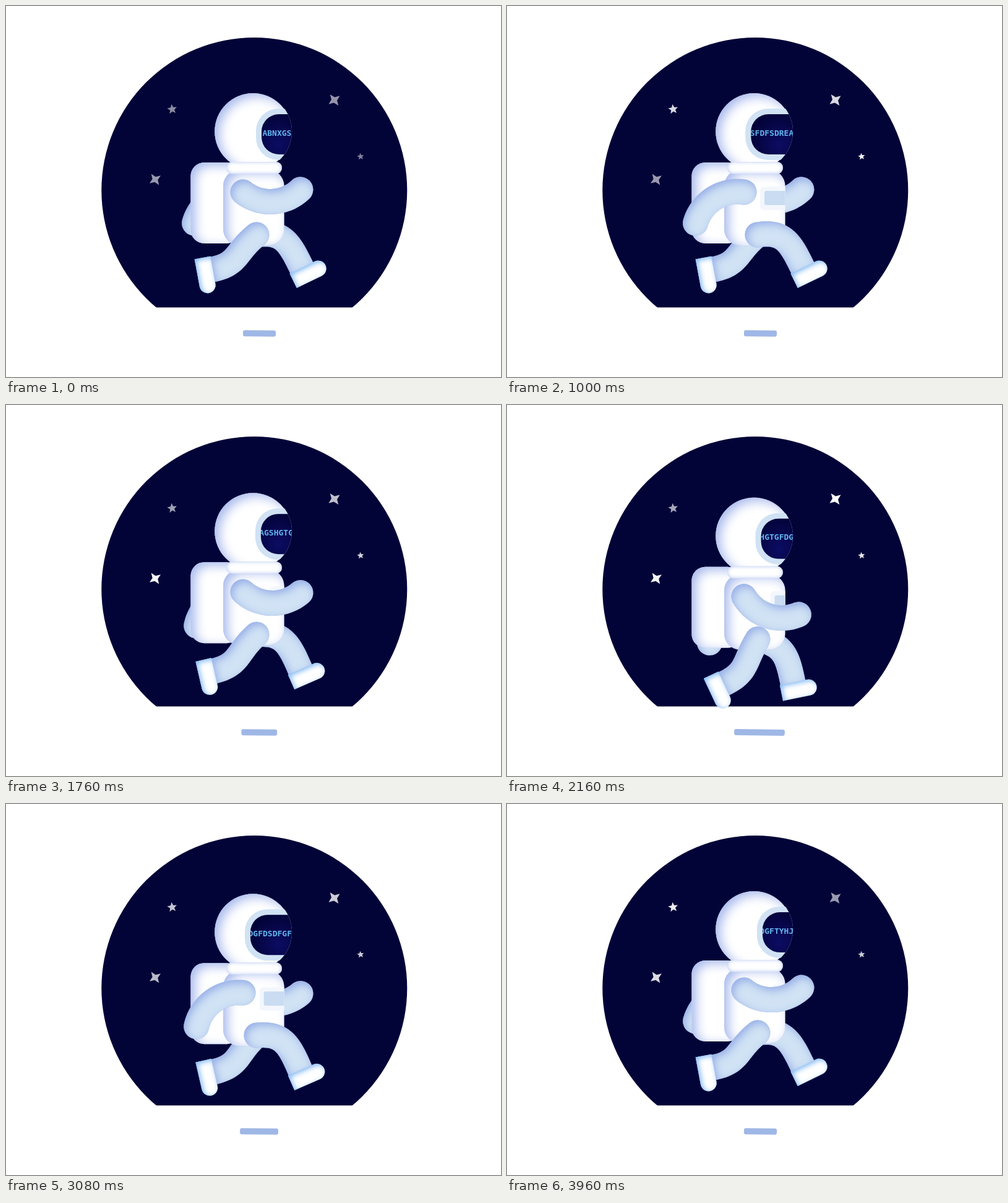
An HTML page with a canvas that plays this animation: 800 by 600 pixels, repeating every 4 s.

```html
<!DOCTYPE html>
<html lang="en">
<head>
<meta charset="utf-8">
<title>Running astronaut</title>
<style>
  html, body { margin: 0; width: 100%; height: 100%; overflow: hidden; background: #fff; }
  canvas { display: block; }
</style>
</head>
<body>
<canvas id="stage" width="800" height="600"></canvas>
<script>
const ctx = document.getElementById('stage').getContext('2d');
const LOOP = 4000, STEP = 1000;
const RAD = Math.PI / 180;
const SUIT = '#fff', LIMB = '#d0e2f4', LIMB_SHADE = '#94ace6', NIGHT = '#020337';
const MESSAGE = 'ABNXGSFDFSDREAGSHGTGFDGFDSDFGFDGFTYHJ';

const lerp = (a, b, k) => a + (b - a) * k;

// Cubic bezier easing with flat ends: (x1, 0, x2, 1)
const bezier = (x1, x2) => x => {
  let lo = 0, hi = 1;
  for (let i = 0; i < 24; i++) {
    const s = (lo + hi) / 2, r = 1 - s;
    if (3 * x1 * s * r * r + 3 * x2 * s * s * r + s ** 3 < x) lo = s; else hi = s;
  }
  return 3 * lo * lo * (1 - lo) + lo ** 3;
};
const swingEase = bezier(0.36, 0);
const turnEase = bezier(0.25, 0.4);
const softEase = bezier(0.33, 0.67);
const settleEase = bezier(0.3, 0.2);

// Rises from 0 to 1 at the peak, then falls back to 0
const pulse = (u, peak, rise, fall) =>
  u < peak ? rise(u / peak) : 1 - fall((u - peak) / (1 - peak));

// Brightness keys of each star over the loop
const TWINKLE_TIMES = [0, 1000, 1400, 2160, 2680, 3400, 3960];
const STARS = [
  { x: 268.5, y: 167, tips: 5, r: 8.3, inner: 3.6, turn: -97, glow: [.55, .85, .6, .65, 1, .6, .92] },
  { x: 530.5, y: 152, tips: 4, r: 11.3, inner: 4.6, turn: -37, glow: [.58, .85, .52, 1, .55, 1, .6] },
  { x: 241, y: 280.5, tips: 4, r: 11, inner: 4.4, turn: -35, glow: [.6, .6, 1, .95, .58, .84, .86] },
  { x: 573, y: 243.5, tips: 5, r: 5.8, inner: 2.6, turn: -97, glow: [.5, .96, .75, .9, .8, .8, .8] }
];

function glowAt(keys, t) {
  const i = TWINKLE_TIMES.findIndex(k => k > t);
  if (i < 0) return keys[keys.length - 1];
  const from = TWINKLE_TIMES[i - 1];
  return lerp(keys[i - 1], keys[i], (t - from) / (TWINKLE_TIMES[i] - from));
}

function box(x, y, w, h, r) {
  const p = new Path2D();
  p.roundRect(x, y, w, h, r);
  return p;
}

function disc(x, y, r) {
  const p = new Path2D();
  p.arc(x, y, r, 0, 2 * Math.PI);
  return p;
}

// Thick curve from (0,0) to (length,0), leaving upwards at angle a, arriving downwards at angle b
function tube(length, a, b, handle, roundEnd) {
  const half = 20.5, N = 24, q = Math.PI / 2;
  const L = length * handle;
  const x1 = L * Math.cos(a), y1 = -L * Math.sin(a);
  const x2 = length - L * Math.cos(b), y2 = -L * Math.sin(b);
  const p = new Path2D();
  const edge = (s, side) => {
    const r = 1 - s;
    const x = 3 * r * r * s * x1 + 3 * r * s * s * x2 + s ** 3 * length;
    const y = 3 * r * r * s * y1 + 3 * r * s * s * y2;
    const dx = r * r * x1 + 2 * r * s * (x2 - x1) + s * s * (length - x2);
    const dy = r * r * y1 + 2 * r * s * (y2 - y1) - s * s * y2;
    const k = side * half / Math.hypot(dx, dy);
    p.lineTo(x + dy * k, y - dx * k);
  };
  for (let i = 0; i <= N; i++) edge(i / N, 1);
  if (roundEnd) p.arc(length, 0, half, b - q, b + q);
  for (let i = N; i >= 0; i--) edge(i / N, -1);
  p.arc(0, 0, half, q - a, 3 * q - a);
  p.closePath();
  return p;
}

const ARM = tube(93, 41.3 * RAD, 41.3 * RAD, 0.38, true);
const ANKLE = 27.5 * RAD;
const BOOT = new Path2D();
BOOT.moveTo(0, 21);
BOOT.arc(13, -24, 13, Math.PI, 0);
BOOT.lineTo(26, 21);
BOOT.closePath();

// Fill with a soft shade falling inwards from the edges
function shaded(path, fill, shade, blur, dx, dy) {
  ctx.save();
  ctx.fillStyle = fill;
  ctx.fill(path);
  ctx.clip(path);
  const outside = new Path2D();
  outside.rect(-1500, -1500, 3000, 3000);
  outside.addPath(path);
  ctx.shadowColor = ctx.fillStyle = shade;
  ctx.shadowBlur = blur;
  ctx.shadowOffsetX = dx;
  ctx.shadowOffsetY = dy;
  ctx.fill(outside, 'evenodd');
  ctx.restore();
}

const suitPart = path => shaded(path, SUIT, '#a6b8ec', 18, 7, 5);

// Limb poses: 0 is one end of the swing, 1 the other
function arm(k) {
  ctx.save();
  ctx.translate(383, 301);
  ctx.rotate(lerp(-2.5, 147.4, k) * RAD);
  ctx.scale(1, -1);
  shaded(ARM, LIMB, LIMB_SHADE, 14, 3, 5);
  ctx.restore();
}

function leg(k) {
  ctx.save();
  ctx.translate(405, 370);
  ctx.rotate(lerp(142, 36.5, k) * RAD);
  shaded(tube(91, lerp(0, 46, k) * RAD, ANKLE, 0.48, false), LIMB, LIMB_SHADE, 14, 4, 4);
  ctx.translate(90, 0);
  ctx.rotate(ANKLE);
  shaded(BOOT, SUIT, '#7db6f4', 9, 3, 2);
  ctx.restore();
}

function sky(t) {
  ctx.fillStyle = NIGHT;
  ctx.save();
  ctx.beginPath();
  ctx.rect(0, 0, 800, 487.5);
  ctx.clip();
  ctx.fill(disc(401.3, 298, 247));
  ctx.restore();

  for (const s of STARS) {
    ctx.beginPath();
    for (let i = 0; i < s.tips * 2; i++) {
      const a = s.turn * RAD + i * Math.PI / s.tips, r = i % 2 ? s.inner : s.r;
      ctx.lineTo(s.x + r * Math.cos(a), s.y + r * Math.sin(a));
    }
    ctx.fillStyle = `rgba(255,255,255,${glowAt(s.glow, t)})`;
    ctx.fill();
  }
}

function helmet(visorX, t) {
  suitPart(disc(399.3, 203, 62));
  ctx.save();
  ctx.clip(disc(399.3, 203, 62.8));
  ctx.fillStyle = LIMB;
  ctx.fill(box(visorX, 166, 120, 83, 36));
  const glass = box(visorX + 9, 175, 120, 65, 28);
  const glow = ctx.createRadialGradient(440, 224, 4, 440, 218, 44);
  glow.addColorStop(0, '#0b0b60');
  glow.addColorStop(1, '#03033a');
  ctx.fillStyle = glow;
  ctx.fill(glass);
  ctx.clip(glass);
  ctx.fillStyle = '#62b4ee';
  ctx.font = 'bold 13px "DejaVu Sans Mono", monospace';
  ctx.fillText(MESSAGE, 414.5 - t * 0.0608, 209.7);
  ctx.restore();
}

function torso(panelX) {
  suitPart(box(298.5, 253, 80, 131, 22));
  const body = box(351, 265, 98.5, 122, 26);
  suitPart(body);
  ctx.save();
  ctx.clip(body);
  ctx.fillStyle = '#f3f7fd';
  ctx.fill(box(panelX - 7, 292, 60, 38, 6));
  ctx.fillStyle = '#c9dcf1';
  ctx.fill(box(panelX, 299, 60, 23, 3));
  ctx.restore();
}

function groundShadow(step, u) {
  const grow = (step === 1 ? 48 : 68) * pulse(u, 0.36, softEase, settleEase);
  const w = 53 + grow;
  ctx.save();
  ctx.translate(409.5 - grow * 0.052, 529.5);
  ctx.rotate(0.6 * RAD);
  ctx.fillStyle = '#9fb7e6';
  ctx.fill(box(-w / 2, -5, w, 10, 3));
  ctx.restore();
}

function draw() {
  const t = performance.now() % LOOP;
  const step = Math.floor(t / STEP), u = t % STEP / STEP;
  const across = e => step % 2 ? 1 - e : e;
  const swing = across(swingEase(u));
  const turn = across(turnEase(u));

  ctx.fillStyle = '#fff';
  ctx.fillRect(0, 0, 800, 600);
  sky(t);
  groundShadow(step, u);

  ctx.save();
  ctx.translate(0, 10.5 * pulse(u, 0.26, turnEase, turnEase));
  arm(1 - swing);
  leg(1 - swing);
  torso(lerp(435, 416, turn));
  helmet(lerp(404, 385.3, turn), t);
  shaded(box(356, 252, 90, 19.5, 9.7), SUIT, '#b4c5f0', 6, 0, 0);
  leg(swing);
  arm(swing);
  ctx.restore();

  requestAnimationFrame(draw);
}
draw();
</script>
</body>
</html>
```
